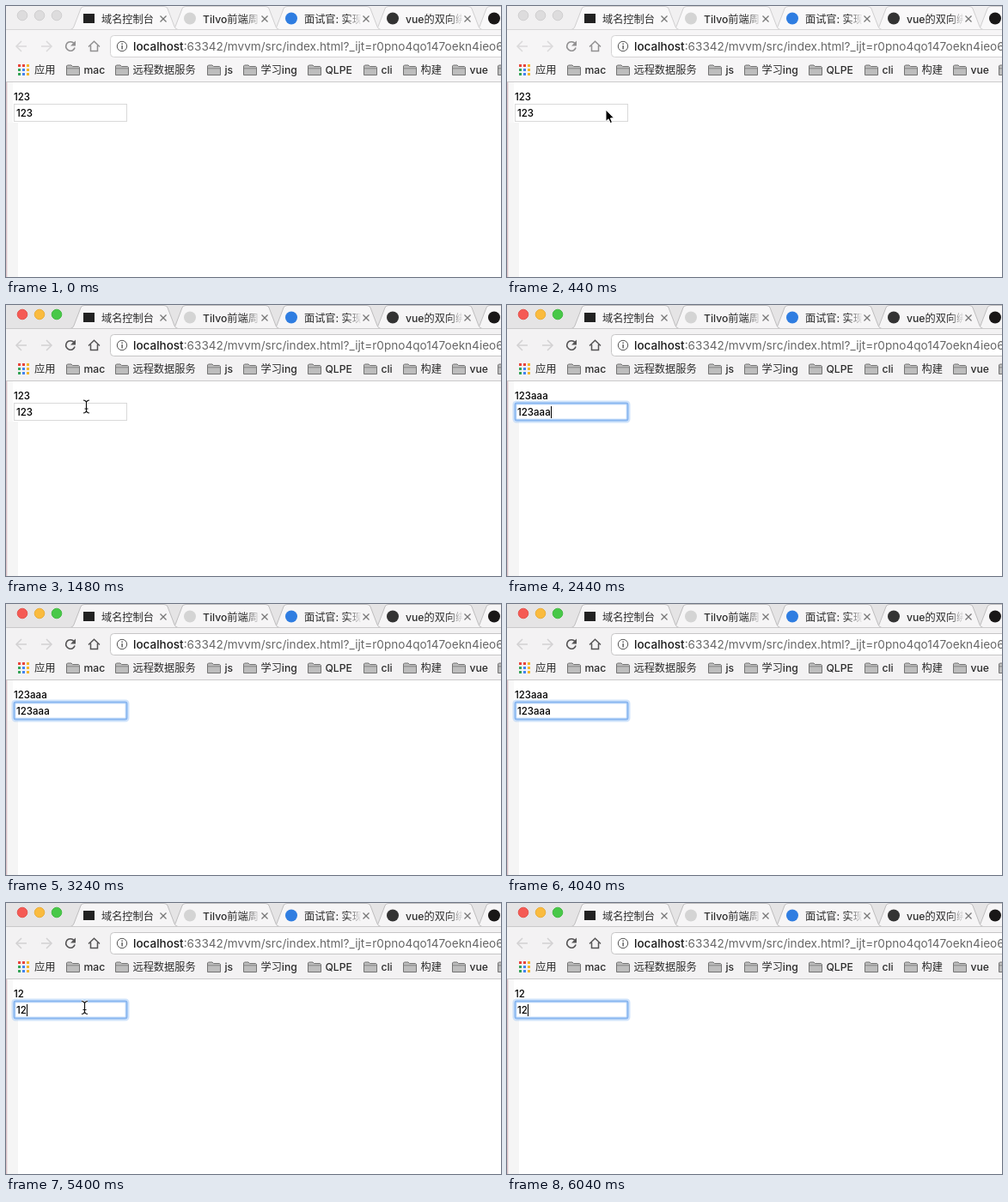
Recreate the animation shown at these times as an HTML page with a canvas. Size 576x316 px, loop 6.36 s.

```html
<!DOCTYPE html>
<html lang="zh-CN">
<head>
<meta charset="utf-8">
<style>
  html, body { margin: 0; width: 100%; height: 100%; overflow: hidden; background: #fff; }
  canvas { display: block; }
</style>
</head>
<body>
<canvas id="stage" width="576" height="316"></canvas>
<script>
const ctx = document.getElementById('stage').getContext('2d');
const LOOP = 6360, STEP = 40;
const FONT = 'Inter, "Noto Sans CJK SC", "Noto Sans CJK", sans-serif';

const FOCUS = 1720;
const EDITS = [
  [0, '123'], [FOCUS, '123'], [1960, '123a'], [2120, '123aa'], [2280, '123aaa'],
  [4360, '123aa'], [4560, '123a'], [4760, '123'], [4960, '12']
];
// time, x, y
const ARROW_IN = [[40, 532, 285], [240, 240, 165], [440, 115, 121], [640, 96, 118], [720, 95, 118]];
const IBEAM = [[1480, 93.5, 118.5], [1560, 91.5, 122]];
const LEAVE = [[5400, 91.5, 122], [5600, 98, 132], [5760, 122, 190], [6000, 165, 300], [6040, 170, 318]];

const TABS = [
  { x: 77, title: '域名控制台', icon: '#222', shape: 'square' },
  { x: 195, title: 'Tilvo前端周刊', icon: '#d4d4d4', shape: 'circle' },
  { x: 313, title: '面试官: 实现', icon: '#2f7de1', shape: 'circle' },
  { x: 431, title: 'vue的双向绑定', icon: '#333', shape: 'circle' },
  { x: 549, title: '', icon: '#191717', shape: 'circle' }
];
const BOOKMARKS = [
  [70, 'mac'], [127, '远程数据服务'], [234, 'js'], [276, '学习ing'],
  [351, 'QLPE'], [416, 'cli'], [462, '构建'], [519, 'vue'], [572, '']
];

const clamp = v => Math.max(0, Math.min(1, v));
const mix = (a, b, k) => a + (b - a) * k;
const gray = (inactive, active, k) => {
  const v = Math.round(mix(inactive, active, k));
  return `rgb(${v},${v - 1},${v})`;
};
const rgbMix = (a, b, k) => `rgb(${a.map((v, i) => Math.round(mix(v, b[i], k)))})`;

function along(path, t) {
  const i = path.findIndex(p => p[0] > t);
  if (i < 0) return path[path.length - 1].slice(1);
  const a = path[Math.max(0, i - 1)], b = path[i];
  const k = clamp((t - a[0]) / (b[0] - a[0] || 1));
  return [mix(a[1], b[1], k), mix(a[2], b[2], k)];
}

function rect(x, y, w, h, color) {
  ctx.fillStyle = color;
  ctx.fillRect(x, y, w, h);
}

function disc(x, y, r, fill, stroke) {
  ctx.beginPath();
  ctx.arc(x, y, r, 0, 7);
  if (fill) { ctx.fillStyle = fill; ctx.fill(); }
  if (stroke) { ctx.strokeStyle = stroke; ctx.stroke(); }
}

function poly(points, { fill, stroke, width = 1, close = false }) {
  ctx.beginPath();
  points.forEach(([x, y]) => ctx.lineTo(x, y));
  if (close) ctx.closePath();
  if (fill) { ctx.fillStyle = fill; ctx.fill(); }
  if (stroke) { ctx.strokeStyle = stroke; ctx.lineWidth = width; ctx.stroke(); }
  ctx.lineWidth = 1;
}

function text(str, x, y, size, color, weight = 400) {
  ctx.font = `${weight} ${size}px ${FONT}`;
  ctx.fillStyle = color;
  ctx.fillText(str, x, y);
  return ctx.measureText(str).width;
}

function drawTab({ x, title, icon, shape }, k) {
  const fill = gray(249, 246, k);
  ctx.beginPath();
  ctx.moveTo(x - 2, 27.5);
  ctx.quadraticCurveTo(x + 1, 27, x + 2, 24);
  ctx.lineTo(x + 10, 3);
  ctx.quadraticCurveTo(x + 11, .5, x + 14, .5);
  ctx.lineTo(x + 107, .5);
  ctx.quadraticCurveTo(x + 110, .5, x + 111, 3);
  ctx.lineTo(x + 119, 24);
  ctx.quadraticCurveTo(x + 120, 27, x + 123, 27.5);
  ctx.fillStyle = fill;
  ctx.fill();
  ctx.strokeStyle = gray(208, 190, k);
  ctx.stroke();

  if (shape === 'square') rect(x + 13, 9, 13, 11, icon);
  else disc(x + 19, 14.5, 7, icon);
  if (!title) return;

  ctx.save();
  ctx.beginPath();
  ctx.rect(x + 33, 2, 67, 25);
  ctx.clip();
  const fade = ctx.createLinearGradient(x + 84, 0, x + 101, 0);
  fade.addColorStop(0, '#2b2b2b');
  fade.addColorStop(1, title.length > 5 ? fill : '#2b2b2b');
  text(title, x + 34, 19.5, 12.2, fade, 500);
  ctx.restore();

  const cx = x + 106;
  for (const d of [-1, 1])
    poly([[cx - 3.5, 15 - 3.5 * d], [cx + 3.5, 15 + 3.5 * d]], { stroke: '#777', width: 1.2 });
}

function drawFolder(x) {
  poly([[x + .5, 70], [x + 1.5, 69], [x + 6, 69], [x + 7.5, 70.5], [x + 14.5, 70.5],
    [x + 15.5, 71.5], [x + 15.5, 80.5], [x + .5, 80.5]],
    { fill: '#bdbdbd', stroke: '#747474', close: true });
  poly([[x + 1, 72.8], [x + 15, 72.8]], { stroke: '#858585' });
}

function drawNavigation(k) {
  const dim = gray(218, 210, k), strong = gray(145, 85, k);
  for (const [x, d] of [[18, 1], [47, -1]]) {
    poly([[x - 6 * d, 47], [x + 6 * d, 47]], { stroke: dim, width: 1.5 });
    poly([[x, 41], [x - 6 * d, 47], [x, 53]], { stroke: dim, width: 1.5 });
  }
  ctx.beginPath();
  ctx.arc(75, 47, 5.3, .3, 5.5);
  ctx.lineWidth = 1.6;
  ctx.strokeStyle = strong;
  ctx.stroke();
  ctx.lineWidth = 1;
  poly([[81, 40.5], [81, 46.5], [75, 46.5]], { fill: strong });
  poly([[96, 47.5], [102.5, 41.3], [109, 47.5]], { stroke: strong, width: 1.5 });
  poly([[98.5, 46], [98.5, 52.5], [106.5, 52.5], [106.5, 46]], { stroke: strong, width: 1.5 });
}

function drawAddressBar(k) {
  ctx.beginPath();
  ctx.roundRect(121.5, 34.5, 480, 25, 4);
  ctx.fillStyle = '#fff';
  ctx.fill();
  ctx.strokeStyle = gray(212, 198, k);
  ctx.stroke();
  disc(135, 47, 5.7, null, '#555');
  rect(134.4, 46, 1.4, 4.5, '#555');
  rect(134.4, 43.5, 1.4, 1.5, '#555');
  const w = text('localhost', 148, 52, 13.5, '#1a1a1a', 500);
  text(':63342/mvvm/src/index.html?_ijt=r0pno4qo147oekn4ieo6', 148 + w, 52, 13.6, '#666');
}

function drawBookmarks() {
  const colors = ['#e8453c', '#e8453c', '#f3b52c', '#35a457', '#4384f0', '#f3b52c', '#35a457', '#4384f0', '#f3b52c'];
  colors.forEach((c, i) => rect(14 + i % 3 * 5, 68 + Math.floor(i / 3) * 5, 3, 3, c));
  text('应用', 33, 79, 12.3, '#2b2b2b', 500);
  for (const [x, name] of BOOKMARKS) {
    drawFolder(x);
    text(name, x + 20.5, 79, 12.2, '#2b2b2b', 500);
  }
}

function drawBrowser(k) {
  rect(0, 0, 576, 28, gray(241, 229, k));
  const lights = [[245, 90, 84], [250, 187, 62], [72, 200, 72]];
  lights.forEach((c, i) => disc(19 + 20 * i, 11, 5.8,
    rgbMix([221, 220, 221], c, k), rgbMix([208, 207, 208], c.map(v => v * .93), k)));
  [...TABS].reverse().forEach(tab => drawTab(tab, k));
  rect(0, 27, 576, 61, gray(246, 243, k));
  rect(0, 27, 576, 1, gray(215, 202, k));
  drawNavigation(k);
  drawAddressBar(k);
  drawBookmarks();
  rect(0, 88, 576, 1, '#cbcacb');
}

function drawPage(t) {
  rect(0, 89, 576, 227, '#fff');
  rect(2, 89, 6, 47, '#f8f8f8');
  rect(2, 136, 12, 180, '#f5f5f5');
  rect(0, 89, 1, 227, '#d8c0c5');
  rect(1, 89, 1, 227, '#ebe3e5');

  const [edited, value] = EDITS.filter(e => e[0] <= t).pop();
  text(value, 9, 110, 11.5, '#000', 500);

  rect(9, 114, 132, 21, '#fff');
  ctx.strokeStyle = '#d9d9d9';
  ctx.strokeRect(9.5, 114.5, 131, 20);
  const w = text(value, 12, 129, 11.5, '#000', 500);

  if (t < FOCUS) return;
  const k = clamp((t - FOCUS + STEP) / 160), grow = (1 - k) * 4;
  ctx.globalAlpha = k;
  for (const [inset, width, color] of [[0, 5, 'rgba(150,192,245,.45)'], [.5, 2, '#8ab7f0']]) {
    ctx.beginPath();
    ctx.roundRect(9 + inset - grow, 114 + inset - grow, 132 - 2 * inset + 2 * grow, 21 - 2 * inset + 2 * grow, 2);
    ctx.lineWidth = width;
    ctx.strokeStyle = color;
    ctx.stroke();
  }
  ctx.lineWidth = 1;
  ctx.globalAlpha = 1;
  if ((t - edited) % 1000 < 500) rect(Math.round(12 + w), 118, 1, 14, '#000');
}

function drawArrow([x, y]) {
  poly([[0, 0], [0, 13.5], [3.1, 10.8], [5.2, 15.6], [7.5, 14.6], [5.4, 9.9], [9.5, 9.7]]
    .map(([dx, dy]) => [x + dx, y + dy]), { fill: '#000', stroke: '#fff', close: true });
}

function drawIBeam([x, y]) {
  for (const [color, width] of [['rgba(255,255,255,.9)', 3], ['#111', 1.2]]) {
    poly([[x, y - 6], [x, y + 6]], { stroke: color, width });
    for (const d of [-1, 1])
      poly([[x - 3.5, y + 7.5 * d], [x - 1.5, y + 7 * d], [x, y + 5.5 * d], [x + 1.5, y + 7 * d], [x + 3.5, y + 7.5 * d]],
        { stroke: color, width });
  }
  poly([[x - 2, y + 2.5], [x + 2, y + 2.5]], { stroke: '#111' });
}

function drawPointer(t) {
  if (t >= 40 && t < 1480) drawArrow(along(ARROW_IN, t));
  else if (t >= 1480 && t < 1960) drawIBeam(along(IBEAM, t));
  else if (t >= 5400 && t < 6040) (t < 5600 ? drawIBeam : drawArrow)(along(LEAVE, t));
}

function frame(now) {
  const t = Math.floor(now % LOOP / STEP) * STEP;
  const active = t < 920 ? 0 : t < 960 ? .5 : 1;
  ctx.lineWidth = 1;
  drawBrowser(active);
  drawPage(t);
  drawPointer(t);
}

const start = performance.now();
function tick() {
  frame(performance.now() - start);
  requestAnimationFrame(tick);
}
tick();
</script>
</body>
</html>
```
